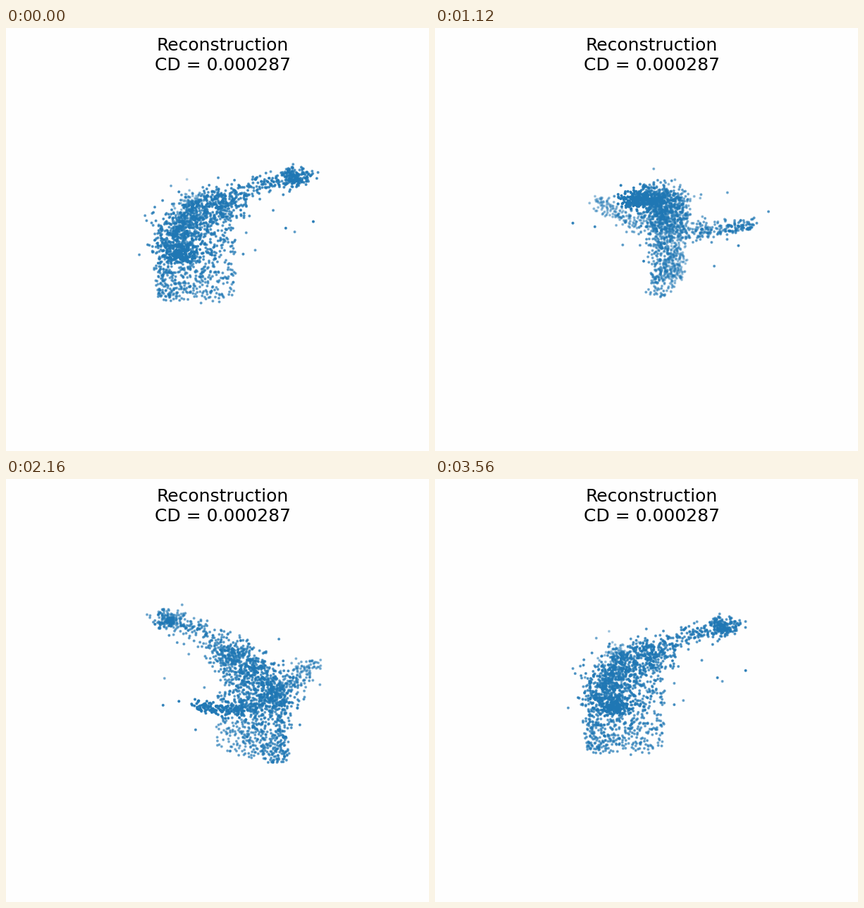
Animation of 600 by 600 pixels, one loop 3.6 s. Source, as a matplotlib script:

```python
import numpy as np
import matplotlib.pyplot as plt
from matplotlib.animation import FuncAnimation
from matplotlib.colors import to_rgb

SIZE = 600
FRAMES = 90
INTERVAL = 40
CENTER = np.array([313.7, 296.8])
EYE = 2497.0
ELEV = np.radians(20)
PHASE = -3
BLUE = to_rgb("#1f77b4")
PAPER = "#fefefe"

rng = np.random.default_rng(11)


# Points are (u, w, z): along the neck, sideways, upwards.
def blob(n, center, sigma):
    return rng.normal(center, sigma, (n, 3))


def strip(n, start, end, sigma):
    """Scatter points evenly along a line."""
    t = rng.uniform(0, 1, (n, 1))
    line = (1 - t) * np.array(start) + t * np.array(end)
    return line + rng.normal(0, sigma, (n, 3))


def wing(n, root, tip):
    t = rng.uniform(0, 1, n)
    p = np.outer(1 - t, root) + np.outer(t, tip)
    p[:, 2] = root[2] + (tip[2] - root[2]) * t ** 1.8
    p[:, 0] += rng.normal(0, 1, n) * (16 - 5 * t)
    p[:, 1] += rng.normal(0, 3, n)
    p[:, 2] += rng.normal(0, 1, n) * (7 - 2 * t)
    return p


def body(n):
    """An arched back, widest in the middle."""
    t = rng.uniform(0, 1, n)
    u = 20 * (1 - t) ** 2 - 110 * t * (1 - t) - 88 * t ** 2
    z = 53 * (1 - t) ** 2 + 118 * t * (1 - t) - 18 * t ** 2
    half = 15 + 13 * np.sin(np.pi * t)
    w = half * rng.uniform(-1, 1, n)
    return np.column_stack([u, w, z]) + rng.normal(0, 1, (n, 3)) * [11, 1, 13]


def sheet(n):
    """A thin vertical plate below the back."""
    u = rng.uniform(-100, 10, n)
    low = -95 + 10 * np.abs((u + 46) / 58) ** 4
    top = 50 + 0.6 * (u - 10)
    z = low + (top - low) * rng.uniform(0, 1, n) ** 1.1
    u += rng.normal(0, 3, n)
    return np.column_stack([u, rng.uniform(-14, 14, n), z])


cloud = np.vstack([
    wing(215, (-62, 14, -6), (-71, 122, 20)),
    wing(215, (-60, -14, -6), (-42, -134, 23)),
    body(680),
    sheet(600),
    strip(30, (10, 0, 62), (45, 0, 76), (5, 9, 8)),
    strip(85, (40, 0, 78), (95, -2, 86), (5, 9, 6)),
    blob(120, (98, -2, 86), (11, 11, 6)),
    strip(35, (96, 0, 86), (92, -40, 88), (5, 2, 3)),
    blob(25, (-92, 0, 20), (18, 28, 26)),
    blob(10, (80, 0, 75), (25, 20, 14)),
    blob(14, (0, 0, 25), (50, 70, 40)),
])


def project(deg):
    a = np.radians(deg)
    u, w, z = cloud.T
    right = u * np.cos(a) - w * np.sin(a)
    toward = u * np.sin(a) + w * np.cos(a)
    up = z * np.cos(ELEV) - toward * np.sin(ELEV)
    near = toward * np.cos(ELEV) + z * np.sin(ELEV)
    scale = 1 / (1 - near / EYE)
    xy = CENTER + np.column_stack([right * scale, -up * scale])
    order = np.argsort(near)
    return xy[order], near[order]


fig = plt.figure(figsize=(6, 6), dpi=100, facecolor=PAPER)
ax = fig.add_axes([0, 0, 1, 1])
ax.set_xlim(0, SIZE)
ax.set_ylim(SIZE, 0)
ax.axis("off")
ax.text(307.5, 59.6, "Reconstruction\nCD = 0.000287", fontsize=18,
        family="DejaVu Sans", ha="center", va="baseline")
dots = ax.scatter(cloud[:, 0], cloud[:, 1], s=2, color=BLUE, linewidths=1.5)


def draw(i):
    xy, near = project(PHASE + 360 * i / FRAMES)
    # Far points fade to 30 % opacity.
    alpha = 0.3 + 0.7 * (near - near[0]) / (near[-1] - near[0])
    rgba = np.column_stack([np.tile(BLUE, (len(near), 1)), alpha])
    dots.set_offsets(xy)
    dots.set_facecolors(rgba)
    dots.set_edgecolors(rgba)
    return (dots,)


anim = FuncAnimation(fig, draw, frames=FRAMES, interval=INTERVAL,
                     repeat=True, repeat_delay=0)
plt.show()
```
